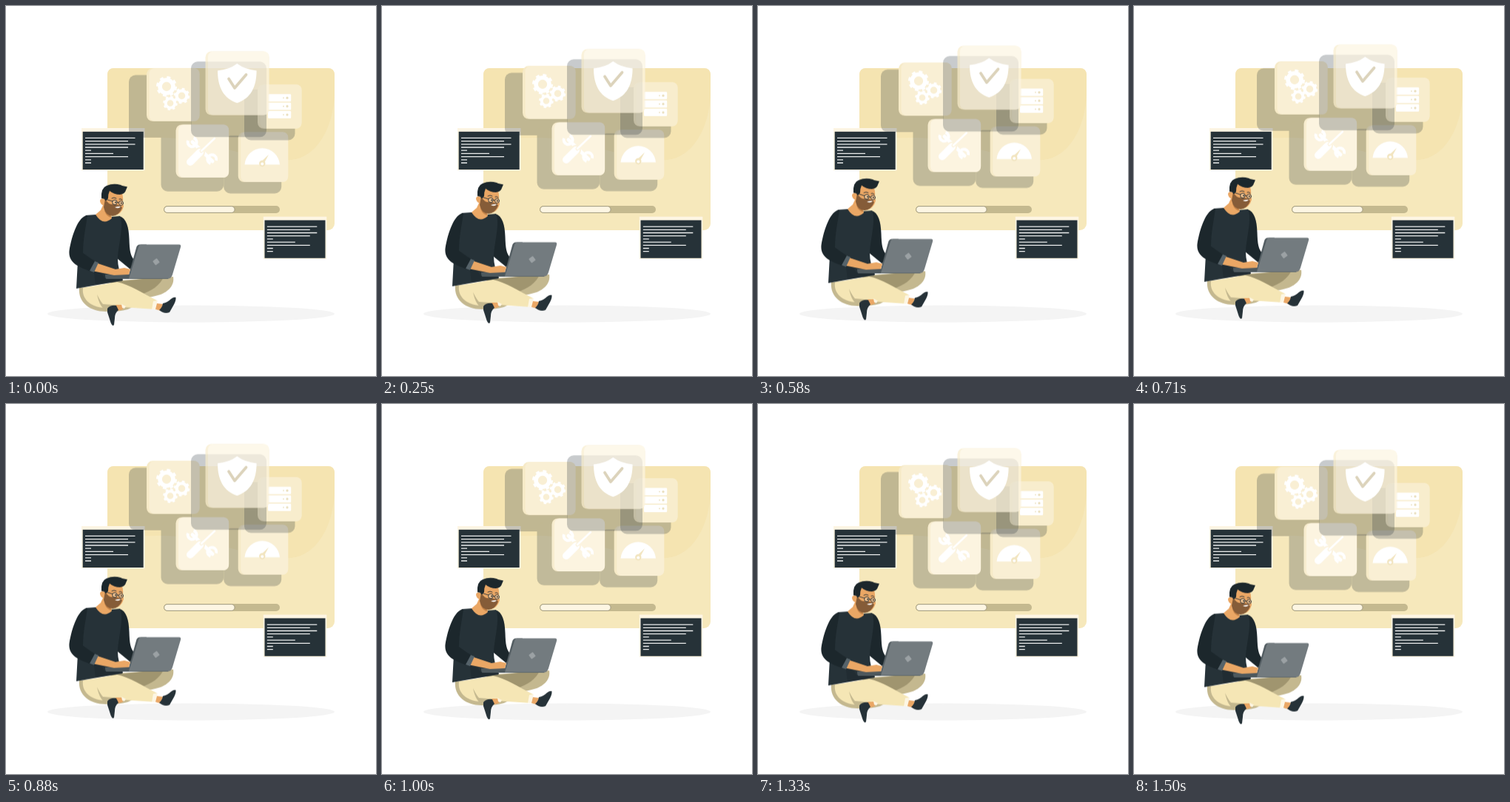
Animation of 500 by 500 pixels, one loop 1540 ms. Source, as an HTML page:

```html
<!DOCTYPE html>
<html lang="en">
<head>
<meta charset="utf-8">
<title>Developer at work</title>
<style>
  html, body { margin: 0; width: 100%; height: 100%; overflow: hidden; background: #fff; }
  svg { display: block; width: 100vw; height: 100vh; }
  .ink { fill: #263238; }
  .deep { fill: #1c272c; }
  .skin { fill: #eaa765; }
  .sand { fill: #f5e6b5; }
  .tan { fill: #c4b88f; }
  .white { fill: #fff; }
  .line { fill: none; stroke-linecap: round; stroke-linejoin: round; }
</style>
</head>
<body>
<svg viewBox="0 0 500 500">
  <ellipse cx="250" cy="416" rx="194" ry="11.5" fill="#f4f4f4"/>

  <!-- panel and progress bar -->
  <rect x="137" y="84" width="307" height="219" rx="9" fill="#f6e8bb"/>
  <path d="M137 170V93q0-9 9-9H435q9 0 9 9V120C442 165 420 205 385 208C330 211 270 176 205 178C175 179 150 176 137 170Z" fill="#f5e4b1"/>
  <rect x="213" y="270" width="157" height="10" rx="5" fill="#c4b98f"/>
  <rect x="213.7" y="270.7" width="95.3" height="8.6" rx="4.3" fill="#fdf6e3" stroke="#8f8870" stroke-width=".7"/>

  <g id="windows"></g>

  <g id="float">
    <g id="shades" class="ink" opacity=".25"></g>
    <g id="gears"></g>
    <g id="tools"></g>
    <g id="gauge"></g>
    <g id="server"></g>
    <g id="shield"></g>

    <!-- legs -->
    <path class="tan" d="M140 372L226 366C228 378 219 386 209 390C192 396 173 395 160 390Z"/>
    <path d="M140 374L213 366C209 377 196 386 182 390Z" fill="#a0956f"/>
    <path class="tan" d="M99 381C97 401 114 413 134 413Q160 414 171 407L150 376Z"/>
    <path class="sand" d="M104 381L150 373C168 377 184 388 204 398L201 410L157 407L133 408C114 407 102 396 104 381Z"/>
    <path class="tan" d="M123 390Q128 400 131 403L156 405L136 411Q127 409 123 390Z"/>
    <path class="skin" d="M148 404L157 404L158 410L151 412Z"/>
    <path d="M156 403L162 406L160 409L157 408Z" fill="#fdf6e3"/>
    <path class="ink" d="M137 409Q141 404 149 405L152 411Q147 415 147 422L146 431Q144 434 141.500 428Q139 420 137 414Z"/>
    <path d="M199 399L205 398L202 410L197 410Z" fill="#fdf6e3"/>
    <path class="skin" d="M204 402L212 403L209 412L202 410Z"/>
    <path class="ink" d="M212 402Q218 401 223 396Q227 393 229.500 394Q230 399 225 407L221 414Q214 417 207 411Q211 408 212 402Z"/>

    <!-- body -->
    <path class="deep" d="M153 284C163 287 166 299 166.500 315C167 331 168 338 174 344L168 356L151 342L148 305Z"/>
    <path class="ink" d="M108 283L122 282L143 285L154 284C160 296 152 322 151 342Q151 355 158 371L95 382L97 345L93 310Z"/>
    <path class="deep" d="M117 342L133 368L158 369L157 372L121 377Z" opacity=".5"/>
    <path class="deep" d="M110 283C98 284 89 309 85.500 331C84 348 99 353 115 359L121 346L104 334C104 315 108 298 110 283Z"/>
    <path class="skin" d="M133 265L128 276L121 282Q131 298 143 287L141 277Z"/>
    <path d="M133 277Q136 285 142 286L141 280Z" fill="#c28248"/>

    <!-- head -->
    <path class="skin" d="M134 250L155 248Q159 257 158 265L159 271Q156 282 146 283Q136 283 132 270Q127 268 127 263Q128 259 133 261Z"/>
    <path d="M134 261Q139 270 147 268L155 270L157 273Q153 283 144 284Q134 283 132 272Z" fill="#855c38"/>
    <path d="M147 272Q152 275 155 271Q151 271 147 272Z" fill="#fff"/>
    <path class="deep" d="M129 260Q128 246 136 243Q145 239 155 242L157 243L164 244.500L162 249Q161 254 154 255Q146 255 140 250Q138 254 138 260Q135 266 133 261Z"/>
    <g class="line" stroke="#263238" stroke-width=".9">
      <circle cx="147" cy="265.500" r="3.300" fill="#f3c28e"/>
      <circle cx="155.500" cy="266.500" r="3" fill="#f3c28e"/>
      <path d="M150.300 265.500L152.500 266M143.700 264L134 261M143 260Q146 258 149 260M153 261Q155 260 157 262"/>
    </g>
    <circle class="ink" cx="148" cy="265.500" r="1"/>
    <circle class="ink" cx="155.800" cy="266.500" r="1"/>

    <!-- laptop and hand -->
    <path d="M134 363H223L219 369H136Q134 369 134 363Z" fill="#4d585d"/>
    <path d="M181 322.500H190L172 367H165L176 327Q177 322.500 181 322.500Z" fill="#535d62"/>
    <path d="M183 322.500H234Q237 322.500 236 326L225 363Q223.500 368.500 219 368.500H166L179 326Q180 322.500 183 322.500Z" fill="#737b7f"/>
    <rect x="199.500" y="342.300" width="7" height="7" rx="1" transform="rotate(53 203 345.800)" fill="#9ba1a4"/>
    <path class="skin" d="M121 347L148 356L160 354L168 356L166 363L146 364L116 358Z"/>
    <path d="M120 345L125 347L119 360L113 358Z" fill="#56636a"/>
  </g>
</svg>
<script>
const $ = id => document.getElementById(id);
const put = (id, html) => $(id).insertAdjacentHTML('beforeend', html);
const rect = (x, y, w, h, rx, attrs) =>
  `<rect x="${x}" y="${y}" width="${w}" height="${h}" rx="${rx}" ${attrs}/>`;

// Terminal windows
const widths = [67.5, 58, 67.5, 58, 8, 38, 58, 8, 8];
function terminal(dx, dy) {
  const rows = widths.map((w, i) => `M107 ${178.4 + i * 4.2}h${w}`).join('');
  put('windows', `<g transform="translate(${dx} ${dy})">` +
    rect(102, 165, 85.5, 57.3, 0, 'fill="#fdf5e3"') +
    rect(103.7, 169.8, 82, 51.2, 0, 'class="ink"') +
    `<path d="${rows}" stroke="#e9ebeb" stroke-width="1.3"/></g>`);
}
terminal(0, 0);
terminal(245.8, 119.7);

// Cards: a side face on the left and a front face
function card(id, x, y, size, side, front, alpha = 1) {
  put(id, `<g opacity="${alpha}">` + rect(x, y, size, size, 8, `fill="${side}"`) +
    rect(x + 3.5, y, size - 3.5, size, 7, `fill="${front}"`) + '</g>');
}
const shade = (id, x, y, size, attrs = '') => put(id, rect(x, y, size, size, 9, attrs));
const soft = 'class="ink" opacity=".25"';

shade('shades', 166, 93.5, 84.5);
shade('shades', 209.5, 166, 84.7);
shade('shades', 294.2, 175.5, 78);

// Gears
function gear(x, y, r) {
  const pitch = Math.PI * r * 0.88 / 4;
  const ring = (k, w, dash) => `<circle cx="${x}" cy="${y}" r="${r * k}" fill="none" stroke="#fff" stroke-width="${r * w}" ${dash}/>`;
  put('gears', ring(.64, .4, '') + ring(.88, .24, `stroke-dasharray="${pitch * .5} ${pitch * .5}"`));
}
card('gears', 190, 84.3, 71.5, '#f6eac7', '#f9efd4');
gear(217, 109, 14);
gear(237.5, 121.5, 10.8);
gear(222, 131.5, 9.8);

// Wrench and screwdriver
card('tools', 229.5, 160.4, 71.6, '#f8edcf', '#fcf4e0');
put('tools', `<g class="line" stroke="#fff">
  <path d="M252 184L279 210" stroke-width="5"/>
  <path d="M253.500 178.500A6 6 0 1 1 246 182M276.500 213A6 6 0 1 1 284 209" stroke-width="4" stroke-linecap="butt"/>
  <path d="M249 211L262 198" stroke="#fcf4e0" stroke-width="14"/>
  <path d="M249 211L262 198" stroke-width="10"/>
  <path d="M264 196L282 179" stroke="#fcf4e0" stroke-width="5"/>
  <path d="M264 196L282 179" stroke-width="2.500"/></g>`);

// Gauge
card('gauge', 313.7, 170.5, 67.5, '#f6eac7', '#f9efd4');
put('gauge', `<path class="white" d="M322.500 214.500A23.800 23.800 0 0 1 370 214.500Z"/>
  <path d="M344.500 211L355 201L348.500 213Z" fill="#f2e5c0"/>
  <circle cx="346.300" cy="213" r="4.200" fill="#f2e5c0"/>
  <circle class="white" cx="346.300" cy="213.500" r="2"/>`);

// Server rack
shade('server', 322, 113, 68.5, soft);
card('server', 340, 106.3, 59.5, '#f6eac7', '#f8edcd');
for (const y of [119.3, 130.7, 142.1])
  put('server', rect(354, y, 31.2, 9.9, 1.2, 'class="white"') +
    `<circle cx="375" cy="${y + 5}" r=".9" fill="#eadfbd"/><circle cx="380" cy="${y + 5}" r="1.6" fill="#eadfbd"/>`);

// Shield
shade('shield', 250, 75.3, 102, soft);
card('shield', 269.5, 61.5, 86, '#f8edcc', '#fdf5e1', .7);
put('shield', `<path class="white" d="M312.300 78Q302 86 286 87.500C286 110 294 125 312.300 131.300C330.500 125 338.600 110 338.600 87.500Q323 86 312.300 78Z"/>
  <path class="line" d="M301 98.500L309 111L324.500 93" stroke="#dcd3bb" stroke-width="3.800"/>`);

// Straight rise and fall
const steps = [[0, 0], [720, -9.47], [1500, .53], [1540, .53]];
const loop = 1540;
$('float').animate(
  steps.map(([t, y]) => ({ offset: t / loop, transform: `translateY(${y}px)` })),
  { duration: loop, iterations: Infinity });
</script>
</body>
</html>
```
